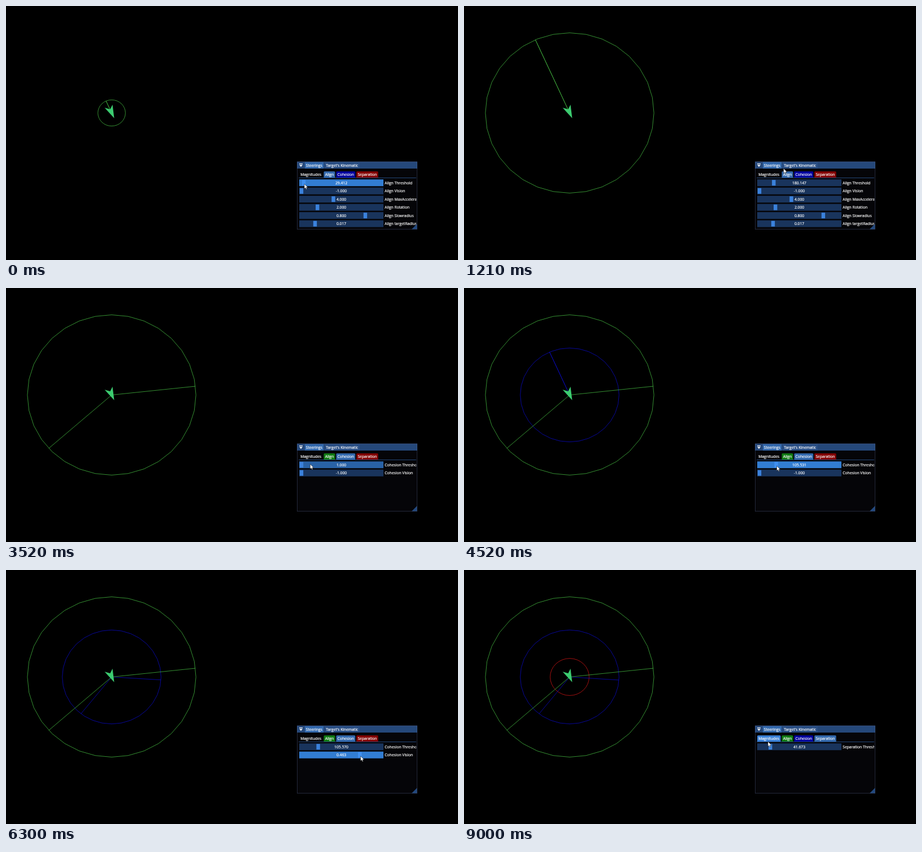
These frames come from a looping animation (800 px wide and 450 px high, 9210 ms). An HTML page with a canvas:

```html
<!DOCTYPE html>
<html lang="en">
<head>
<meta charset="utf-8">
<title>Steering panel</title>
<style>
  html, body { margin: 0; width: 100%; height: 100%; overflow: hidden; background: #000; }
  canvas { display: block; width: 800px; height: 450px; }
</style>
</head>
<body>
<canvas id="stage" width="800" height="450"></canvas>
<script>
const ctx = document.getElementById('stage').getContext('2d');
ctx.font = '6.75px "Open Sans", "Noto Sans", sans-serif';

const LOOP = 9210;
const LEAD = 50;    // the pointer runs ahead of the value it drags
const GRIP = 110;   // press before a drag starts
const AGENT = { x: 187, y: 189.5, sx: 0.828, sy: 0.788, heading: 66 * Math.PI / 180 };
const PANEL = { x: 515, y: 275.7, w: 213, h: 120.3 };
const BAR = { x: 519, w: 149, h: 12, top: 307.2, pitch: 14.5 };

// keys hold [time, value]; a slider with several keys is dragged through them.
const slider = (label, lo, hi, ...keys) => ({ label, lo, hi, keys });
const fixed = (label, hi, value) => slider(label, 0, hi, [0, value]);

const align = slider('Align Threshold', 1, 1000, [0, 29.412], [210, 29.412], [880, 180.147]);
const alignVision = slider('Align Vision', -1, 1, [1690, -1], [2120, 0.463], [2240, 0.56], [2800, 0.305]);
const cohesion = slider('Cohesion Threshold', 1, 500, [3730, 1], [4530, 105.57]);
const cohesionVision = slider('Cohesion Vision', -1, 1,
  [5020, -1], [5420, 0.25], [5540, 0.33], [5860, 0.196], [6330, 0.466]);
const separation = slider('Separation Threshold', 1, 300, [7380, 1], [7820, 59], [8340, 41.673]);

const tabs = [
  { name: 'Magnitudes', opens: Infinity, rows: [] },
  { name: 'Align', opens: 0, fill: '#107a14', rows: [
    align, alignVision,
    fixed('Align MaxAcceleration', 10, 4), fixed('Align Rotation', 10, 2),
    fixed('Align Slowradius', 1, 0.8), fixed('Align targetRadius', 0.1, 0.017)
  ] },
  { name: 'Cohesion', opens: 3220, fill: '#00009c', rows: [cohesion, cohesionVision] },
  { name: 'Separation', opens: 6870, fill: '#820000', rows: [separation] }
];

let nextX = BAR.x;
for (const tab of tabs) {
  tab.x = nextX;
  tab.w = ctx.measureText(tab.name).width + 4.4;
  nextX += tab.w + 2;
}

// Smooth interpolation that never overshoots its points.
function sample(points, t) {
  const last = points.length - 1;
  if (t <= points[0][0]) return points[0][1];
  if (t >= points[last][0]) return points[last][1];
  let i = 0;
  while (t >= points[i + 1][0]) i++;
  const slope = k => (points[k + 1][1] - points[k][1]) / (points[k + 1][0] - points[k][0]);
  const tangent = k => {
    if (k === 0 || k === last) return 0;
    const a = slope(k - 1), b = slope(k);
    return a * b <= 0 ? 0 : 2 * a * b / (a + b);
  };
  const [t0, v0] = points[i], [t1, v1] = points[i + 1];
  const d = t1 - t0, u = (t - t0) / d, r = 1 - u;
  return v0 * (1 + 2 * u) * r * r + v1 * (3 - 2 * u) * u * u
    + d * (tangent(i) * u * r * r - tangent(i + 1) * u * u * r);
}

const rowY = i => BAR.top + i * BAR.pitch;
const grabX = (row, value) => BAR.x + 4 + (value - row.lo) / (row.hi - row.lo) * 141.2;
const dragStart = row => row.keys[0][0] - GRIP;
const dragEnd = row => row.keys[row.keys.length - 1][0] + 70;

// The pointer's route follows from the tab clicks, the drags and a few idle stops.
function buildRoute() {
  const stops = [[1240, 566, 287], [8550, 552, 297], [8880, 552, 297], [9000, 538, 304]];
  for (const tab of tabs) {
    if (tab.opens > 0 && tab.opens < LOOP) {
      for (const dt of [-50, 40]) stops.push([tab.opens + dt, tab.x + tab.w / 2, 298.5]);
    }
    tab.rows.forEach((row, i) => {
      if (row.keys.length < 2) return;
      const y = rowY(i) + BAR.h / 2 + 2;
      const stop = (t, value) => stops.push([t, grabX(row, value) + 1, y]);
      stop(dragStart(row), row.keys[0][1]);
      row.keys.forEach(([t, value]) => stop(t - LEAD, value));
      stop(dragEnd(row), row.keys[row.keys.length - 1][1]);
    });
  }
  return stops.sort((a, b) => a[0] - b[0]);
}
const route = buildRoute();
const routeX = route.map(([t, x]) => [t, x]);
const routeY = route.map(([t, , y]) => [t, y]);

function rect(x, y, w, h, color) {
  ctx.fillStyle = color;
  ctx.fillRect(x, y, w, h);
}

function shape(points, color) {
  ctx.beginPath();
  points.forEach(([x, y]) => ctx.lineTo(x, y));
  ctx.closePath();
  ctx.fillStyle = color;
  ctx.fill();
}

function text(str, x, y, align = 'left') {
  ctx.textAlign = align;
  ctx.fillStyle = ctx.strokeStyle = '#fff';
  ctx.lineWidth = 0.18;
  ctx.fillText(str, x, y);
  ctx.strokeText(str, x, y);
}

function onRing(radius, angle) {
  return [AGENT.x + Math.cos(angle) * radius * AGENT.sx,
          AGENT.y + Math.sin(angle) * radius * AGENT.sy];
}

function ring(radius, color, vision) {
  ctx.strokeStyle = color;
  ctx.lineWidth = 0.85;
  ctx.beginPath();
  for (let i = 0; i < 32; i++) ctx.lineTo(...onRing(radius, i * Math.PI / 16));
  ctx.closePath();
  if (vision !== undefined) {
    const half = Math.acos(vision);
    for (const side of [-1, 1]) {
      ctx.moveTo(AGENT.x, AGENT.y);
      ctx.lineTo(...onRing(radius, AGENT.heading + side * half));
    }
  }
  ctx.stroke();
}

function drawAgent(t) {
  const at = row => sample(row.keys, t);
  ring(at(separation), '#be1414');
  ring(at(cohesion), '#0a0ab4', at(cohesionVision));
  ring(at(align), '#3fa83c', at(alignVision));
  shape([[191.5, 198.7], [174.6, 180.2], [184.4, 183], [188.5, 174.8]], '#3ccb70');
}

function drawTitle() {
  rect(PANEL.x, PANEL.y, PANEL.w, 12.3, '#25487a');
  rect(529, 276.7, 33, 11.3, '#3369ad');
  rect(564, 276.7, 62, 11.3, '#2a4f85');
  rect(519, 279, 6, 1.2, '#fff');
  shape([[519, 281.5], [525, 281.5], [522, 285]], '#fff');
  text('Steerings', 530.7, 284.8);
  text("Target's Kinematic", 566.3, 284.8);
}

function drawTab(tab, isOpen, px, py) {
  const hover = py >= 293 && py <= 304.5 && px >= tab.x && px <= tab.x + tab.w;
  const fill = hover ? '#3a80d6' : isOpen ? '#3369ad' : tab.fill;
  if (fill) {
    ctx.fillStyle = fill;
    ctx.beginPath();
    ctx.roundRect(tab.x, 293, tab.w, 11, [1.5, 1.5, 0, 0]);
    ctx.fill();
  }
  text(tab.name, tab.x + 2.2, 301.4);
}

function drawRow(row, i, t, px, py) {
  const y = rowY(i);
  const value = sample(row.keys, t);
  const held = row.keys.length > 1 && t >= dragStart(row) && t < dragEnd(row);
  const hover = py > y && py < y + BAR.h && px > BAR.x && px < BAR.x + BAR.w;
  rect(BAR.x, y, BAR.w, BAR.h, held ? '#327dd2' : hover ? '#2962a6' : '#19345c');
  rect(grabX(row, value) - 3.2, y + 1, 6.4, BAR.h - 2, held ? '#4090f0' : '#3b82dc');
  text(value.toFixed(3), BAR.x + BAR.w / 2, y + 8.5, 'center');
  text(row.label, 670.2, y + 8.5);
}

function drawPanel(t, px, py) {
  const open = tabs.filter(tab => tab.opens <= t).pop();
  rect(PANEL.x, PANEL.y, PANEL.w, PANEL.h, '#050508');
  drawTitle();
  ctx.save();
  ctx.beginPath();
  ctx.rect(PANEL.x, PANEL.y, 211.3, PANEL.h);
  ctx.clip();
  tabs.forEach(tab => drawTab(tab, tab === open, px, py));
  rect(518, 304, 208, 0.8, '#2a5590');
  open.rows.forEach((row, i) => drawRow(row, i, t, px, py));
  ctx.restore();
  shape([[727.5, 386], [727.5, 395.5], [718, 395.5]], '#23497e');
  ctx.strokeStyle = 'rgba(90, 105, 145, 0.45)';
  ctx.lineWidth = 0.8;
  ctx.strokeRect(PANEL.x + 0.4, PANEL.y + 0.4, PANEL.w - 0.8, PANEL.h - 0.8);
}

function drawPointer(x, y) {
  const outline = [[0, 0], [0, 8.6], [2, 6.9], [3.3, 9.7], [4.7, 9.1], [3.5, 6.3], [6.2, 6.2]];
  shape(outline.map(([dx, dy]) => [x + dx, y + dy]), '#fff');
  ctx.strokeStyle = '#000';
  ctx.lineWidth = 0.5;
  ctx.stroke();
}

function draw(t) {
  const px = sample(routeX, t), py = sample(routeY, t);
  rect(0, 0, 800, 450, '#000');
  drawAgent(t);
  drawPanel(t, px, py);
  drawPointer(px, py);
}

const start = performance.now();
function tick() {
  draw((performance.now() - start) % LOOP);
  requestAnimationFrame(tick);
}
tick();
</script>
</body>
</html>
```
